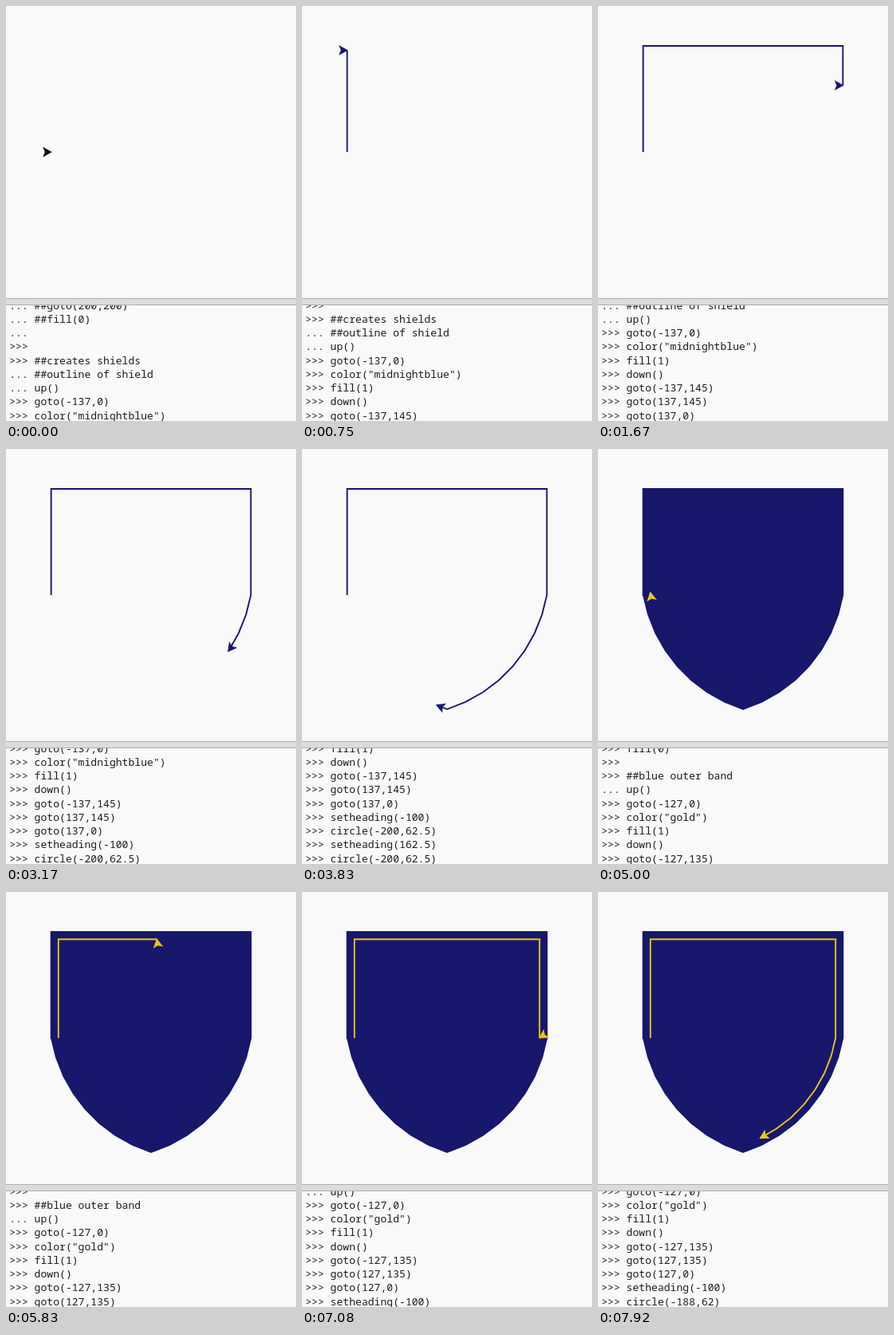
These frames come from a looping animation (364x520 px, 8000 ms). An HTML page with a canvas:

```html
<!DOCTYPE html>
<html lang="en">
<head>
<meta charset="utf-8">
<title>Turtle shield</title>
<style>
html, body { margin: 0; width: 100%; height: 100%; overflow: hidden; background: #f9f9f9; }
canvas { display: block; }
</style>
</head>
<body>
<canvas id="stage" width="364" height="520"></canvas>
<script>
const ctx = document.getElementById('stage').getContext('2d');
const LOOP = 8000, LAST_END = 8014;
const NAVY = '#17176b', GOLD = '#e6c620';
const rad = degrees => degrees * Math.PI / 180;
const mix = (a, b, p) => a + (b - a) * p;

// Each action takes the turtle and the progress p (0 to 1) of its command.
const color = value => (turtle, p) => { if (p === 1) turtle.color = value; };

const up = (turtle) => { turtle.pen = false; };

const down = (turtle) => {
  turtle.pen = true;
  turtle.shapes.push({ color: turtle.color, points: [[turtle.x, turtle.y]], filled: false });
};

const fill = (turtle, p) => { if (p === 1) turtle.shapes.at(-1).filled = true; };

const goto = (x, y) => (turtle, p) => {
  turtle.x = mix(turtle.x, x, p);
  turtle.y = mix(turtle.y, y, p);
  if (turtle.pen) turtle.shapes.at(-1).points.push([turtle.x, turtle.y]);
};

const turn = angle => (turtle, p) => { turtle.heading += angle * p; };

// Clockwise arc made of eight straight pieces.
const circle = (radius, extent) => (turtle, p) => {
  const steps = 8, w = extent / steps, length = 2 * radius * Math.sin(rad(w / 2));
  const start = turtle.heading;
  for (let i = 0; i < steps && p * steps > i; i++) {
    const part = Math.min(1, p * steps - i);
    turtle.heading = start - w * (i + 0.5);
    goto(turtle.x + length * Math.cos(rad(turtle.heading)),
         turtle.y + length * Math.sin(rad(turtle.heading)))(turtle, part);
  }
  if (p === 1) turtle.heading = start - extent;
};

// Shell line, start time in ms, action; a command lasts until the next one starts.
const script = [
  ['... ##goto(200,200)', -1],
  ['... ##fill(0)', -1],
  ['...', -1],
  ['>>>', -1],
  ['>>> ##creates shields', -1],
  ['... ##outline of shield', -1],
  ['... up()', -1, up],
  ['>>> goto(-137,0)', -1, goto(-137, 0)],
  ['>>> color("midnightblue")', 0, color(NAVY)],
  ['>>> fill(1)', 80],
  ['>>> down()', 170, down],
  ['>>> goto(-137,145)', 345, goto(-137, 145)],
  ['>>> goto(137,145)', 768, goto(137, 145)],
  ['>>> goto(137,0)', 1515, goto(137, 0)],
  ['>>> setheading(-100)', 1935, turn(260)],
  ['>>> circle(-200,62.5)', 2874, circle(200, 62.5)],
  ['>>> setheading(162.5)', 3650, turn(-35)],
  ['>>> circle(-200,62.5)', 3776, circle(200, 62.5)],
  ['>>> fill(0)', 4550, fill],
  ['>>>', 4720],
  ['>>> ##blue outer band', 4760],
  ['... up()', 4800, up],
  ['>>> goto(-127,0)', 4840, goto(-127, 0)],
  ['>>> color("gold")', 4890, color(GOLD)],
  ['>>> fill(1)', 4925],
  ['>>> down()', 4955, down],
  ['>>> goto(-127,135)', 4990, goto(-127, 135)],
  ['>>> goto(127,135)', 5416, goto(127, 135)],
  ['>>> goto(127,0)', 6197, goto(127, 0)],
  ['>>> setheading(-100)', 6623, turn(160)],
  ['>>> circle(-188,62)', 7270, circle(188, 62)],
].map(([text, start, action], i, all) =>
  ({ text, start, action, end: all[i + 1]?.[1] ?? LAST_END }));

const toStage = ([x, y]) => [182 + x * 0.915, 183 - y * 0.917];

function trace(points) {
  ctx.beginPath();
  points.forEach(point => ctx.lineTo(...point));
}

function drawShape({ color, points, filled }) {
  trace(points.map(toStage));
  ctx.strokeStyle = ctx.fillStyle = color;
  ctx.lineWidth = 1.9;
  if (filled) {
    ctx.closePath();
    ctx.fill();
  }
  ctx.stroke();
}

function drawArrow({ x, y, heading, color }) {
  ctx.save();
  ctx.translate(...toStage([x, y]));
  ctx.rotate(-rad(heading));
  trace([[0, 0], [-9.4, -5.2], [-7.3, 0], [-9.4, 5.2]]);
  ctx.closePath();
  ctx.fillStyle = ctx.strokeStyle = color;
  ctx.lineWidth = 1.1;
  ctx.fill();
  ctx.stroke();
  ctx.restore();
}

function drawShell(lines) {
  ctx.save();
  ctx.beginPath();
  ctx.rect(0, 375, 364, 145);
  ctx.clip();
  ctx.font = '13.1px "Noto Sans Mono", "DejaVu Sans Mono", monospace';
  ctx.fillStyle = '#1c1c1c';
  lines.slice(-9).reverse().forEach((line, i) => ctx.fillText(line.text, 4.2, 517.6 - i * 17.25));
  ctx.restore();

  ctx.fillStyle = '#dcdcdc';
  ctx.fillRect(0, 366, 364, 9);
  ctx.fillStyle = '#aeaeae';
  ctx.fillRect(0, 366, 364, 1);
  ctx.fillRect(0, 374, 364, 1);
}

function draw(time) {
  const started = script.filter(command => command.start <= time);
  const turtle = { x: -137, y: 0, heading: 0, color: '#111', pen: false, shapes: [] };
  for (const { action, start, end } of started) {
    const p = end > start ? Math.min(1, (time - start) / (end - start)) : 1;
    action?.(turtle, p);
  }
  ctx.fillStyle = '#f9f9f9';
  ctx.fillRect(0, 0, 364, 520);
  turtle.shapes.forEach(drawShape);
  drawArrow(turtle);
  drawShell(started);
}

function frame() {
  draw(performance.now() % LOOP);
  requestAnimationFrame(frame);
}
frame();
</script>
</body>
</html>
```
